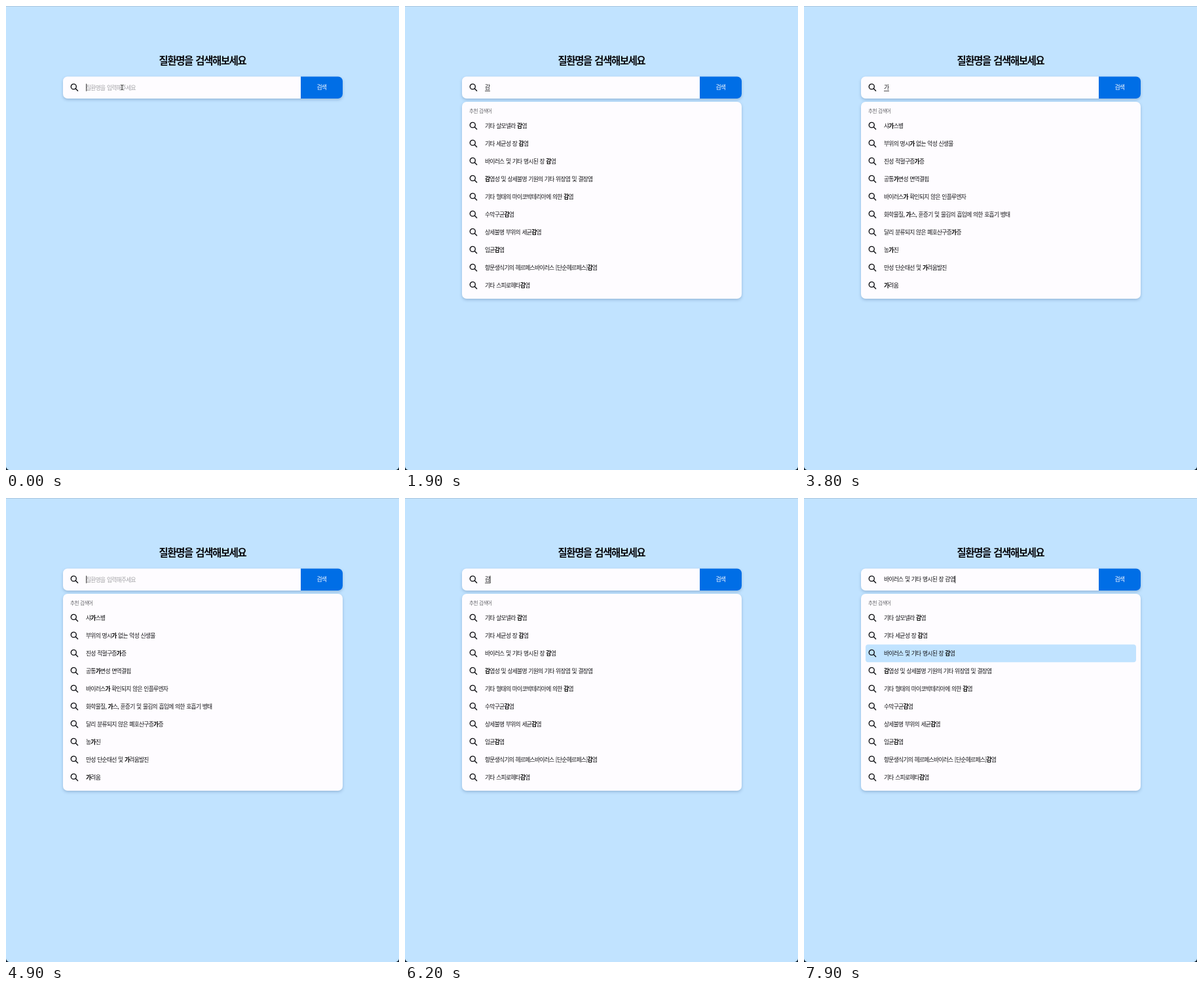
Animation of 600x707 px, one loop 8 s. Source, as an HTML page:

```html
<!DOCTYPE html>
<html lang="ko">
<head>
<meta charset="utf-8">
<title>검색</title>
<style>
  html, body { margin: 0; width: 100%; height: 100%; overflow: hidden; background: #c1e3ff; }
  svg { display: block; width: 600px; height: 707px; }
  text {
    font: 400 8.8px "Noto Sans CJK KR", "Noto Sans CJK", "Noto Sans KR", sans-serif;
    letter-spacing: -.085em; word-spacing: .09em; fill: #151518; white-space: pre;
  }
  .title { font-size: 15.4px; font-weight: 700; fill: #08080c; }
  .button { font-weight: 500; fill: #fff; }
  .label { font-size: 7.7px; fill: #67676c; }
  .placeholder { fill: #a3a3a6; }
  .match { font-weight: 700; fill: #000; }
  .card { fill: #fefcff; filter: drop-shadow(0 2px 2px rgba(20, 60, 110, .25)); }
  .icon { fill: none; stroke: #0a0a0e; stroke-width: 1.4; stroke-linecap: round; }
</style>
</head>
<body>
<svg viewBox="0 0 600 707">
  <defs>
    <g id="search" class="icon">
      <circle cx="-1" cy="-1.1" r="4"/>
      <path d="M1.9 1.8 5.3 5.2"/>
    </g>
  </defs>
  <rect width="600" height="707" fill="#c1e3ff"/>
  <rect width="600" height="1" fill="#abc8df"/>
  <path d="M0 702v5h5Q0.8 706.2 0 702ZM600 702v5h-5Q599.2 706.2 600 702Z" fill="#10202e"/>
  <text class="title" x="300" y="88.7" text-anchor="middle">질환명을 검색해보세요</text>

  <rect class="card" x="87" y="107.5" width="427" height="33.5" rx="7"/>
  <path d="M450 107.5h57a7 7 0 0 1 7 7v19.5a7 7 0 0 1-7 7h-57Z" fill="#006ee6"/>
  <text class="button" x="481.8" y="127.3" text-anchor="middle">검색</text>
  <use href="#search" x="104.3" y="124"/>
  <text id="placeholder" class="placeholder" x="122" y="127.5">질환명을 입력해주세요</text>
  <text id="typed" x="122" y="127.3"></text>
  <rect id="underline" x="122" y="129" width="8" height=".8" fill="#222"/>
  <rect id="caret" y="118.5" width=".9" height="11.3" fill="#111"/>
  <g id="pointer" fill="none" stroke-linecap="round">
    <path id="beam" d="M175.3 120.3q1.5 0 1.9.8.4-.8 1.9-.8M177.2 121v6M175.3 127.8q1.5 0 1.9-.8.4.8 1.9.8" stroke="#fff" stroke-width="2"/>
    <use href="#beam" style="stroke:#111"/>
    <path d="M175.3 120.3q1.5 0 1.9.8.4-.8 1.9-.8M177.2 121v6M175.3 127.8q1.5 0 1.9-.8.4.8 1.9.8" stroke="#111" stroke-width=".9"/>
  </g>

  <g id="panel">
    <rect id="sheet" class="card" x="87" y="146" width="427" height="300" rx="7"/>
    <text class="label" x="98" y="163.3">추천 검색어</text>
    <circle id="spinner" cx="300.3" cy="184" r="11.8" fill="none" stroke="#c1e3ff" stroke-width="2.2"
      pathLength="4" stroke-dasharray="3 1"/>
    <rect id="highlight" x="94" width="413" height="27" rx="4" fill="#c1e3ff"/>
    <g id="results"></g>
  </g>
</svg>
<script>
const LOOP = 8000, ROW = 27;
const LISTS = {
  감: ["기타 살모넬라 감염", "기타 세균성 장 감염", "바이러스 및 기타 명시된 장 감염",
    "감염성 및 상세불명 기원의 기타 위장염 및 결장염", "기타 형태의 마이코박테리아에 의한 감염",
    "수막구균감염", "상세불명 부위의 세균감염", "임균감염",
    "항문생식기의 헤르페스바이러스 [단순헤르페스]감염", "기타 스피로헤타감염"],
  가: ["샤가스병", "부위의 명시가 없는 악성 신생물", "진성 적혈구증가증", "공통가변성 면역결핍",
    "바이러스가 확인되지 않은 인플루엔자", "화학물질, 가스, 훈증기 및 물김의 흡입에 의한 호흡기 병태",
    "달리 분류되지 않은 폐호산구증가증", "농가진", "만성 단순태선 및 가려움발진", "가려움"]
};

// Key presses: composed text, or the row picked with the arrow key.
const KEYS = [
  { at: 0, text: "" },
  { at: 800, text: "ㄱ" }, { at: 900, text: "가" }, { at: 1000, text: "감" },
  { at: 2900, text: "가" }, { at: 4800, text: "" },
  { at: 5500, text: "ㄱ" }, { at: 5600, text: "가" }, { at: 5750, text: "감" },
  { at: 7300, row: 0 }, { at: 7500, row: 1 }, { at: 7700, row: 2 }
];
const PANELS = [
  { at: 0 },
  { at: 1400, loading: true }, { at: 1900, query: "감" },
  { at: 3175, loading: true }, { at: 3700, query: "가" },
  { at: 5000 }, { at: 6100, query: "감" }
];

const $ = id => document.getElementById(id);
const show = (id, on) => $(id).style.display = on ? "" : "none";
const current = (steps, t) => steps.findLast(step => step.at <= t);

const lists = Object.entries(LISTS).map(([query, items]) => {
  const rows = items.map((item, i) => {
    const y = 182.5 + ROW * i;
    const marked = item.replace(query, `<tspan class="match">${query}</tspan>`);
    return `<use href="#search" x="104.3" y="${y}"/><text x="122" y="${y + 3.3}">${marked}</text>`;
  });
  $("results").insertAdjacentHTML("beforeend", `<g id="list-${query}">${rows.join("")}</g>`);
  return query;
});

function drawInput(t) {
  const key = current(KEYS, t);
  const picked = key.row !== undefined;
  const text = picked ? LISTS.감[key.row] : key.text;
  if ($("typed").textContent !== text) $("typed").textContent = text;
  const width = text ? $("typed").getComputedTextLength() : 0;
  show("placeholder", !text);
  show("underline", text && !picked);
  $("underline").setAttribute("width", width + .6);
  $("caret").setAttribute("x", 122.3 + width);
  show("caret", (t - key.at) % 1000 < 500);
  show("pointer", t < KEYS[1].at);
  show("highlight", picked);
  if (picked) $("highlight").setAttribute("y", 223.2 + ROW * (key.row - 2));
}

function drawPanel(t) {
  const { at, loading, query } = current(PANELS, t);
  show("panel", loading || query);
  $("sheet").setAttribute("height", loading ? 64 : 300);
  show("spinner", loading);
  // The gap is a quarter turn, centred on top when the spinner appears.
  $("spinner").setAttribute("transform", `rotate(${(t - at) * .36 - 45} 300.3 184)`);
  lists.forEach(name => show("list-" + name, name === query));
}

const start = performance.now();
function frame() {
  const t = (performance.now() - start) % LOOP;
  drawInput(t);
  drawPanel(t);
  requestAnimationFrame(frame);
}
frame();
</script>
</body>
</html>
```
